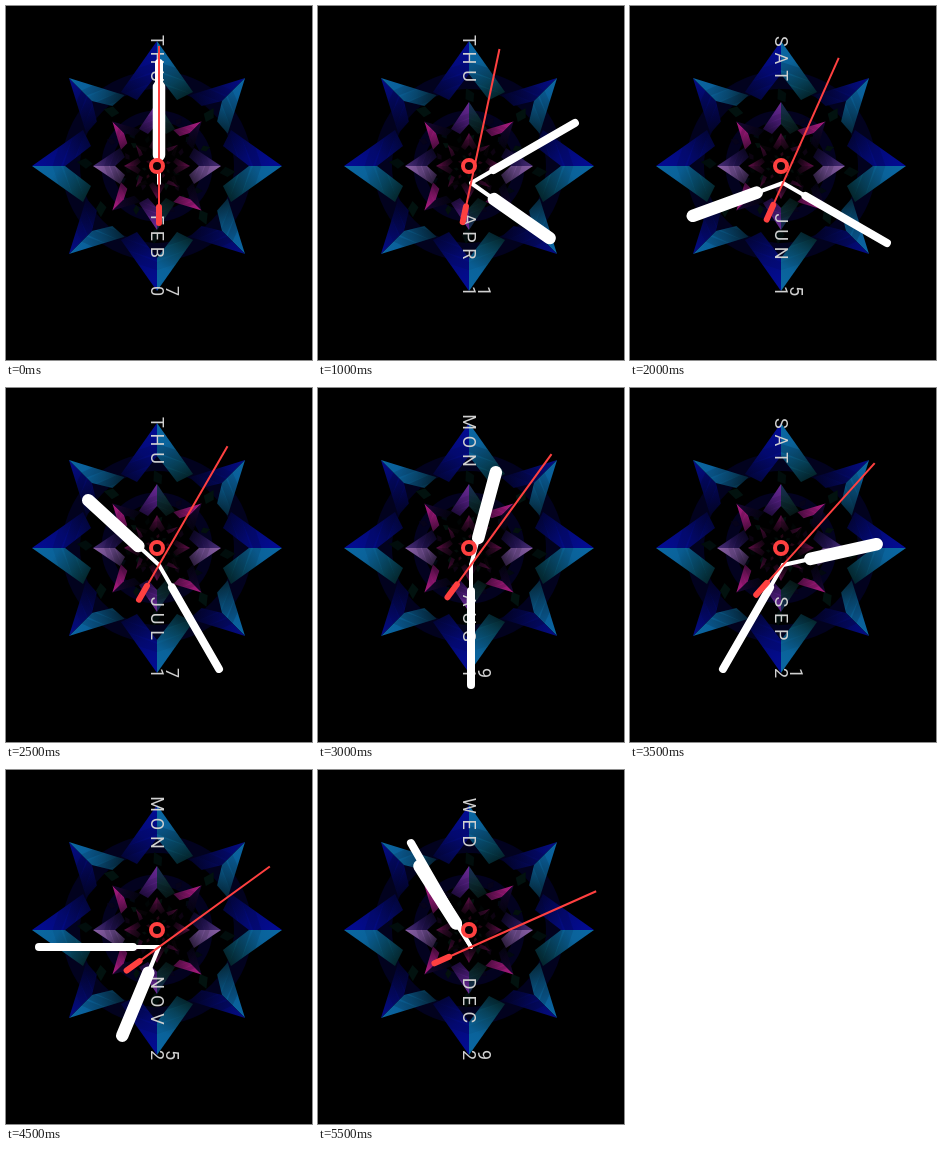
Write an HTML page with a canvas that moves like this. It is 306 px wide and 354 px high and loops after 6000 ms.

```html
<!DOCTYPE html>
<html lang="en">
<head>
<meta charset="utf-8">
<title>Star watch face</title>
<style>
html, body { margin: 0; width: 100%; height: 100%; overflow: hidden; background: #000; }
canvas { display: block; }
</style>
</head>
<body>
<canvas id="face" width="306" height="354"></canvas>
<script>
const W = 306, H = 354, STEP = 500, STEPS = 12;
const STAR = { x: 151, y: 160 }, HUB = { x: 153, y: 177 };
const RED = '#ff4040', WHITE = '#fff';
const DAYS = ['SUN', 'MON', 'TUE', 'WED', 'THU', 'FRI', 'SAT'];
const MONTHS = ['JAN', 'FEB', 'MAR', 'APR', 'MAY', 'JUN', 'JUL', 'AUG', 'SEP', 'OCT', 'NOV', 'DEC'];
const ctx = document.getElementById('face').getContext('2d');

let seed = 11;
function rnd() {
  seed = (seed * 16807) % 2147483647;
  return seed / 2147483647;
}

function poly(g, pts) {
  g.beginPath();
  pts.forEach(p => g.lineTo(p[0], p[1]));
  g.closePath();
}

// One half of a chevron-shaped arm; the arm points up, side is -1 or 1.
function halfArm(g, arm, side, colors) {
  const { tip, shoulder, half, inner, innerHalf, notch } = arm;
  g.save();
  poly(g, [[0, -tip], [side * half, -shoulder], [side * innerHalf, -inner], [0, -notch]]);
  const fill = g.createLinearGradient(0, -tip, side * half, -inner);
  colors.forEach((c, i) => fill.addColorStop(i / (colors.length - 1), c));
  g.fillStyle = fill;
  g.fill();
  g.clip();
  // Facets
  const len = tip - inner;
  for (let i = 0; i < 4; i++) {
    const y = -tip + len * (0.35 + i * 0.18);
    g.fillStyle = `rgba(0,0,20,${0.05 + rnd() * 0.12})`;
    poly(g, [[0, y], [side * half, y + len * 0.2], [side * half, y + len * 0.38], [0, y + len * 0.14]]);
    g.fill();
  }
  g.restore();
}

// Sides facing right and slightly down catch the light.
function arms(g, angles, arm, lit, dark) {
  for (const deg of angles) {
    const a = deg * Math.PI / 180;
    g.save();
    g.rotate(a);
    for (const side of [-1, 1]) {
      const light = side * (Math.cos(a) + 0.4 * Math.sin(a));
      halfArm(g, arm, side, light > 0 ? lit : dark);
    }
    g.restore();
  }
}

function band(g, r, width, color) {
  g.beginPath();
  g.arc(0, 0, r, 0, Math.PI * 2);
  g.lineWidth = width;
  g.strokeStyle = color;
  g.stroke();
}

function shards(g, count, r0, r1, size, colors) {
  for (let i = 0; i < count; i++) {
    g.save();
    g.rotate(i * Math.PI * 2 / count + rnd() * 0.15);
    g.translate(0, -(r0 + rnd() * (r1 - r0)));
    g.rotate(rnd() * 2 - 1);
    g.fillStyle = colors[i % colors.length];
    poly(g, [[0, -size], [size * 0.7, 0], [size * 0.2, size], [-size * 0.6, size * 0.3]]);
    g.fill();
    g.restore();
  }
}

function makeStar() {
  const c = document.createElement('canvas');
  c.width = W;
  c.height = H;
  const g = c.getContext('2d');
  const diagonals = [45, 135, 225, 315];
  g.translate(STAR.x, STAR.y);

  band(g, 86, 18, '#02021e');
  shards(g, 8, 68, 74, 8, ['#010d0c', '#02120f']);
  arms(g, diagonals, { tip: 124.5, shoulder: 73, half: 27, inner: 74, innerHalf: 11, notch: 92 },
    ['#0b66a2', '#0a609a', '#084a72', '#052a3c'], ['#040c88', '#03085c', '#02032a']);
  arms(g, [0, 90, 180, 270], { tip: 125, shoulder: 74, half: 36, inner: 66, innerHalf: 20, notch: 92 },
    ['#0a68a4', '#0a629a', '#07465e', '#031e1c'], ['#030c98', '#030a78', '#020430']);

  band(g, 50, 11, '#03021f');
  shards(g, 16, 38, 52, 5, ['#03100d', '#06031a', '#020810']);
  arms(g, diagonals, { tip: 63, shoulder: 37, half: 14, inner: 37, innerHalf: 5, notch: 47 },
    ['#180632', '#0c0420', '#03020c'], ['#a81c80', '#8c166c', '#4a0c3e']);
  const inner = { tip: 64, shoulder: 37, half: 18, inner: 32, innerHalf: 9, notch: 42 };
  arms(g, [0, 180], inner, ['#1c2c58', '#0c2a30', '#04140f'], ['#6c2a94', '#4a1c74', '#160830']);
  arms(g, [90, 270], inner, ['#8a60a4', '#6a4a88', '#20142c'], ['#4c3078', '#20124c', '#080418']);

  shards(g, 14, 20, 32, 4, ['#03110d', '#010505', '#0c0310']);
  arms(g, diagonals, { tip: 30, shoulder: 19, half: 6, inner: 18, innerHalf: 2, notch: 23 },
    ['#0a0408', '#050204'], ['#400a30', '#20061a']);
  arms(g, [0, 90, 180, 270], { tip: 33, shoulder: 19, half: 8, inner: 16, innerHalf: 4, notch: 21 },
    ['#4c0e3c', '#280820', '#0a0308'], ['#620e48', '#340828', '#0c0308']);
  shards(g, 10, 9, 15, 2.5, ['#240614', '#040c0a']);
  return c;
}

const star = makeStar();

// Text turned a quarter clockwise, centred on y, with its baseline at x.
function sideText(str, x, y, gap) {
  const widths = [...str].map(ch => ctx.measureText(ch).width);
  let pos = -(widths.reduce((a, b) => a + b, 0) + gap * (str.length - 1)) / 2;
  ctx.save();
  ctx.translate(x, y);
  ctx.rotate(Math.PI / 2);
  [...str].forEach((ch, i) => {
    ctx.fillText(ch, pos, 0);
    pos += widths[i] + gap;
  });
  ctx.restore();
}

function calendar(k) {
  const date = (k + 1) * 2 + 5;
  const day = new Date(Date.UTC(2021, k, date)).getUTCDay();
  const digits = String(date).padStart(2, '0');
  ctx.font = '18px Roboto, Arial, sans-serif';
  ctx.fillStyle = '#d0d0d0';
  sideText(DAYS[day], 145, 52.5, 5.8);
  sideText(MONTHS[Math.min(k + 1, 11)], 145, 230.5, 5.8);
  sideText(digits[0], 144.5, 285, 0);
  sideText(digits[1], 160, 285, 0);
}

function line(from, to, width, color, cap) {
  ctx.beginPath();
  ctx.moveTo(0, -from);
  ctx.lineTo(0, -to);
  ctx.lineWidth = width;
  ctx.strokeStyle = color;
  ctx.lineCap = cap;
  ctx.stroke();
}

function hand(deg, paint) {
  ctx.save();
  ctx.translate(HUB.x, HUB.y);
  ctx.rotate(deg * Math.PI / 180);
  paint();
  ctx.restore();
}

function draw(k) {
  ctx.fillStyle = '#000';
  ctx.fillRect(0, 0, W, H);
  ctx.drawImage(star, 0, 0);
  calendar(k);
  hand(k * 62.5, () => {
    line(0, 28, 4, WHITE, 'round');
    line(28, 96, 12.5, WHITE, 'round');
  });
  hand(k * 30, () => {
    line(0, 26, 4, WHITE, 'round');
    line(26, 120, 8, WHITE, 'round');
  });
  hand(k * 6, () => {
    line(-24, 137, 2, RED, 'butt');
    line(-24, -40, 6, RED, 'round');
  });
  ctx.beginPath();
  ctx.arc(STAR.x, STAR.y, 6, 0, Math.PI * 2);
  ctx.fillStyle = '#080204';
  ctx.fill();
  ctx.lineWidth = 4;
  ctx.strokeStyle = RED;
  ctx.stroke();
}

const start = performance.now();
function tick() {
  draw(Math.floor((performance.now() - start) / STEP) % STEPS);
  requestAnimationFrame(tick);
}
tick();
</script>
</body>
</html>
```
